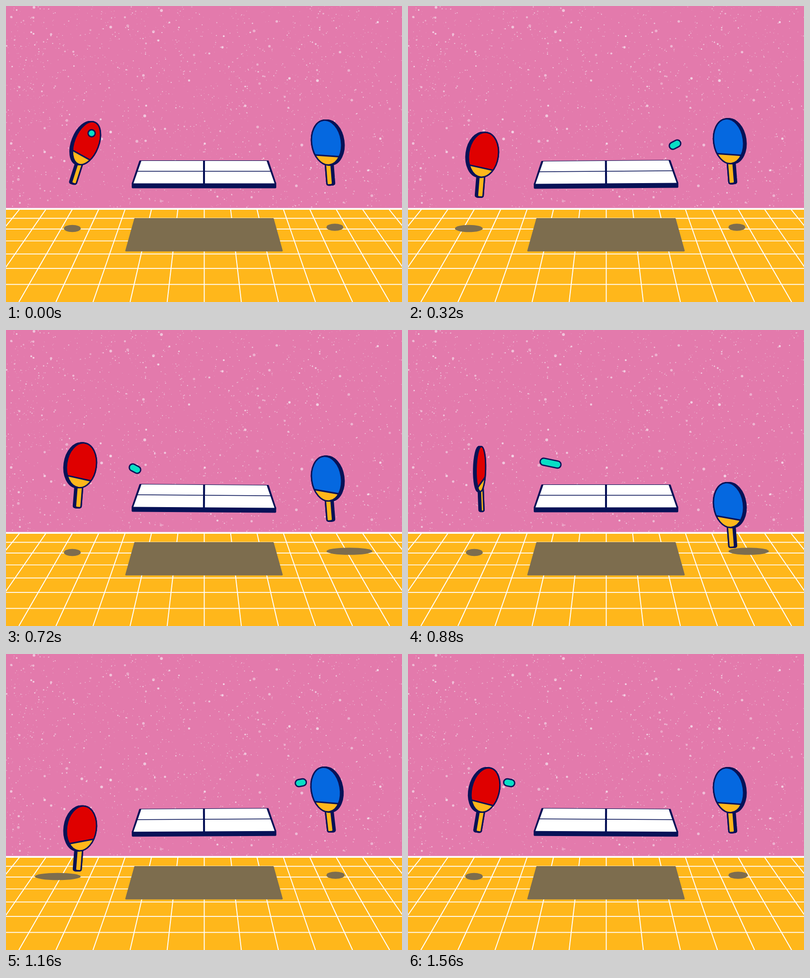
These frames come from a looping animation (800 by 600 pixels, 1.6 s). An HTML page with a canvas:

```html
<!DOCTYPE html>
<html lang="en">
<head>
<meta charset="utf-8">
<title>Table tennis</title>
<style>
  html, body { margin: 0; width: 100%; height: 100%; overflow: hidden; background: #e37aac; }
  canvas { display: block; width: 800px; height: 600px; }
</style>
</head>
<body>
<canvas id="stage" width="800" height="600"></canvas>
<script>
const W = 800, H = 600, LOOP = 1600, LEG = 400, STEP = 40;
const NAVY = '#071257', RED = '#df0000', BLUE = '#0568e0', ORANGE = '#ffb71b',
      TEAL = '#08dfc5', PINK = '#e37aac', SHADE = '#7d6d4e';

// The right paddle mirrors the left one and plays the same strokes later
const LEFT = { side: -1, lag: 0, color: RED, open: 12.5, closed: -10.5, shadowY: 451 };
const RIGHT = { side: 1, lag: 380, color: BLUE, open: -4, closed: -10, shadowY: 448.5 };

const stage = document.getElementById('stage').getContext('2d');
let ctx = stage;

const rad = deg => deg * Math.PI / 180;
const clamp = u => Math.min(1, Math.max(0, u));
const mix = (a, b, u) => a + (b - a) * u;
const ease = u => (u = clamp(u)) * u * (3 - 2 * u);
const arch = u => (u = clamp(u)) * (1 - u) * 4;

// Rises from a to b, holds, falls from c to d; may run past the loop's end
function pulse(p, a, b, c, d) {
  if (p < d - LOOP) p += LOOP;
  return ease((p - a) / (b - a)) * (1 - ease((p - c) / (d - c)));
}

// Pose at phase p: a forehand swing at 0, a backhand flip after 800, a dip after each
function poseAt(p, { open, closed }) {
  const swing = pulse(p, 1510, 1670, 1720, 1860);
  const flip = pulse(p, 780, 880, 890, 1040);
  const recoil = pulse(p, 780, 860, 870, 910);
  const dip = pulse(p, 120, 220, 270, 345) + pulse(p, 1040, 1220, 1220, 1330);
  const spread = pulse(p, 40, 190, 270, 355) + pulse(p, 880, 1120, 1120, 1600);
  const turned = pulse(p, 840, 900, 1330, 1540);
  const sinceHit = p > LOOP / 2 ? p - LOOP : p;
  const lean = 4.5 + 22 * swing - 8 * recoil;
  return {
    lean,
    x: 149 + 0.78 * lean,
    y: 278 + 4 * Math.sin(2 * Math.PI * p / LEG) + 105 * dip,
    rx: 30 - 9 * swing - 20.5 * flip,
    band: mix(open, closed, turned) - 50 * flip
      + 28 * swing * Math.cos(Math.PI * Math.min(1, sinceHit / 100)),
    shadow: 34 + 60 * spread
  };
}

function random(seed) {
  return () => (seed = (seed * 16807) % 2147483647) / 2147483647;
}

function line(x1, y1, x2, y2, width, color) {
  ctx.beginPath();
  ctx.moveTo(x1, y1);
  ctx.lineTo(x2, y2);
  ctx.lineWidth = width;
  ctx.strokeStyle = color;
  ctx.stroke();
}

// Symmetric trapezoid around x = 400 with slightly rounded corners
function trapezoid(top, bottom, halfTop, halfBottom, color, round = 0) {
  ctx.beginPath();
  ctx.moveTo(400 - halfTop, top);
  ctx.lineTo(400 + halfTop, top);
  ctx.lineTo(400 + halfBottom, bottom);
  ctx.lineTo(400 - halfBottom, bottom);
  ctx.closePath();
  ctx.fillStyle = ctx.strokeStyle = color;
  ctx.fill();
  if (round) {
    ctx.lineJoin = 'round';
    ctx.lineWidth = round;
    ctx.stroke();
  }
}

function oval(x, y, rx, ry, color) {
  ctx.beginPath();
  ctx.ellipse(x, y, rx, ry, 0, 0, 7);
  ctx.fillStyle = color;
  ctx.fill();
}

function speckles(count, small, large, seed) {
  const rnd = random(seed);
  for (let i = 0; i < count; i++) {
    const r = mix(small, large, rnd() ** 2);
    oval(rnd() * W, rnd() * 408, r, r, `rgba(245,222,235,${0.4 + 0.5 * rnd()})`);
  }
}

function floor() {
  ctx.fillStyle = ORANGE;
  ctx.fillRect(0, 411, W, 189);
  for (let k = -10; k <= 10; k++) line(400.5 + 53.3 * k, 412, 400.5 + 74.9 * k, 600, 1.9, '#fff');
  for (let k = 0; k < 6; k++) {
    const y = 11074 / (22.976 - k) - 51.7;
    line(0, y, W, y, 1.7, '#fff');
  }
  ctx.fillStyle = '#fff';
  ctx.fillRect(0, 409.5, W, 3.5);
  trapezoid(431.5, 496, 139.5, 157.5, SHADE, 3);
}

function table(tilt) {
  ctx.save();
  ctx.translate(400, 340);
  ctx.rotate(rad(tilt));
  ctx.translate(-400, -340);
  trapezoid(315, 360, 129, 144, NAVY, 4);
  trapezoid(360, 367.5, 144, 144, NAVY, 4);
  trapezoid(314, 359.5, 126.5, 142.5, '#fff');
  line(265, 335, 535, 335, 1.4, NAVY);
  line(400, 313, 400, 361, 4, NAVY);
  ctx.restore();
}

// Drawn for the left side; the right side is flipped
function paddle({ x, y, lean, rx, band }, { side, color }) {
  const grip = 1.5 + 0.14 * rx;
  const handle = dx => {
    ctx.save();
    ctx.translate(x + dx * 0.8, y);
    ctx.rotate(rad(lean));
    ctx.beginPath();
    ctx.roundRect(-grip, 30, 2 * grip, 56, Math.min(grip, 3));
    ctx.restore();
  };
  const head = dx => {
    ctx.beginPath();
    ctx.ellipse(x + dx, y, rx, 45.5, rad(lean + 3.5), 0, 7);
  };
  ctx.save();
  if (side > 0) {
    ctx.translate(W, 0);
    ctx.scale(-1, 1);
  }
  ctx.strokeStyle = ctx.fillStyle = NAVY;
  ctx.lineWidth = 3;
  for (const part of [handle, head]) {
    for (let dx = -5; dx <= 0; dx++) {
      part(dx);
      ctx.fill();
      ctx.stroke();
    }
    if (part === handle) {
      ctx.fillStyle = ORANGE;
      ctx.fill();
      ctx.stroke();
      ctx.fillStyle = NAVY;
    }
  }
  ctx.fillStyle = color;
  ctx.fill();
  ctx.save();
  ctx.clip();
  ctx.translate(x - 27 * Math.sin(rad(lean)), y + 27 * Math.cos(rad(lean)));
  ctx.rotate(rad(band));
  ctx.fillStyle = ORANGE;
  ctx.fillRect(-80, 0, 160, 90);
  line(-80, 0, 80, 0, 3, NAVY);
  ctx.restore();
  head(0);
  ctx.lineWidth = 2.6;
  ctx.stroke();
  ctx.restore();
}

// Two parabolas that meet where the ball touches the table
function ball(t, dir) {
  const bounce = 187, u = t / bounce;
  const v = clamp((t - bounce) / (LEG - bounce)) ** 1.6;
  const falling = t < bounce;
  const x = falling ? mix(173, 466, ease(u)) : mix(466, 627, ease(v));
  const streak = falling ? 29 * arch(u) : 10 * arch(v);
  const run = falling ? x - 173 : x - 627, bend = falling ? 0.0009 : 0.003;
  const y = 258 + bend * run * run;
  const angle = Math.atan(2 * bend * run);
  const dx = dir * Math.cos(angle) * streak / 2, dy = Math.sin(angle) * streak / 2;
  const cx = dir > 0 ? x : W - x;
  ctx.lineCap = 'round';
  for (const [width, color] of [[17, NAVY], [11.6, TEAL]]) {
    line(cx - dx, y - dy, cx + dx + 0.01, y + dy, width, color);
  }
  ctx.lineCap = 'butt';
}

// The table rocks and settles after the bounce
function tiltAt(t) {
  const s = Math.max(0, t - 190);
  return 1.2 * Math.sin(2 * Math.PI * s / 200) * Math.exp(-s / 150);
}

const backdrop = document.createElement('canvas');
backdrop.width = W;
backdrop.height = H;
ctx = backdrop.getContext('2d');
ctx.fillStyle = PINK;
ctx.fillRect(0, 0, W, H);
speckles(2200, 0.45, 1.2, 4711);
speckles(190, 1.3, 2.9, 97);
floor();
ctx = stage;

function draw(time) {
  const t = Math.floor(time / STEP) * STEP % LOOP;
  const dir = t % (2 * LEG) < LEG ? 1 : -1;
  const players = [LEFT, RIGHT].map(who => [poseAt((t + who.lag) % LOOP, who), who]);
  ctx.drawImage(backdrop, 0, 0);
  for (const [pose, { side, shadowY }] of players) {
    const r = pose.shadow / 2;
    oval(399.2 + side * (248.2 + r), shadowY, r, 7.3, SHADE);
  }
  table(dir * tiltAt(t % LEG));
  for (const [pose, who] of players) paddle(pose, who);
  ball(t % LEG, dir);
}

const start = performance.now();
function tick() {
  draw(performance.now() - start);
  requestAnimationFrame(tick);
}
tick();
</script>
</body>
</html>
```
